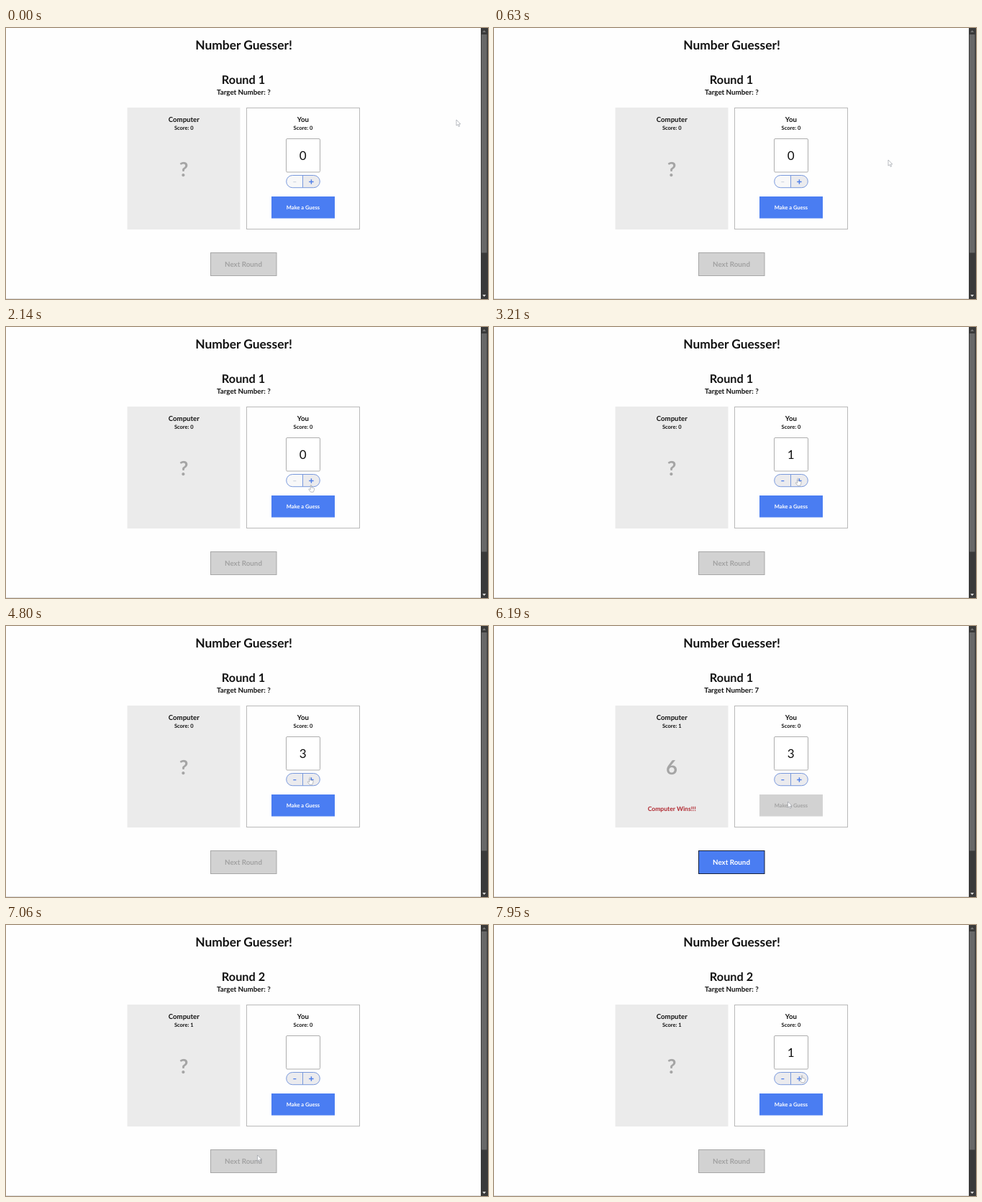
Write an HTML page that moves like this. It is 670x378 px and loops after 8 s.

```html
<!DOCTYPE html>
<html lang="en">
<head>
<meta charset="utf-8">
<title>Number Guesser</title>
<style>
  html, body { margin: 0; width: 100%; height: 100%; overflow: hidden; background: #fefefe; }
  svg { display: block; width: 670px; height: 378px; }
  text { font-family: Lato, "Open Sans", sans-serif; font-weight: 700; text-anchor: middle;
         fill: #111; text-rendering: geometricPrecision; }
  .label { font-size: 9.6px; }
  .score { font-size: 7.5px; }
  .sign { font-size: 12px; fill: #4f7fe8; }
  .off .sign { fill: #d3d8e2; }
  .half { fill: #ebebee; }
  .off .half { fill: #f8f8f9; }
  .button rect { fill: #4a7df2; stroke: #4a7df2; }
  .button text { fill: #fff; }
  .button.off rect { fill: #d2d2d2; stroke: #d2d2d2; }
  .button.off text { fill: #a2a2a2; }
  #next rect { stroke: #16213c; }
  #next.off rect { stroke: #a6a6a6; }
  .pointer { fill: #fff; stroke: #8d929b; stroke-width: .6; stroke-linejoin: round; }
</style>
</head>
<body>
<svg viewBox="0 0 670 378">
  <rect width="670" height="378" fill="#fefefe"/>
  <rect y="377" width="660" height="1" fill="#dedede"/>

  <text x="330.5" y="30" font-size="17.4">Number Guesser!</text>
  <text id="round" x="330" y="78" font-size="16.3"></text>
  <text id="target" x="330.3" y="93" font-size="9.8"></text>

  <rect x="168.5" y="111" width="157" height="170" fill="#ebebeb"/>
  <text class="label" x="247.3" y="131">Computer</text>
  <text class="score" id="score" x="247.3" y="141.5"></text>
  <text id="pick" x="247" y="206.8" font-size="27.5" style="fill:#a5a5a5"></text>
  <text id="result" x="247.3" y="257.8" font-size="8.6" style="fill:#b0272f">Computer Wins!!!</text>

  <rect x="334.5" y="111.5" width="157" height="169" fill="none" stroke="#b9b9b9"/>
  <text class="label" x="412.8" y="131.2">You</text>
  <text class="score" x="413" y="142">Score: 0</text>
  <rect x="389.5" y="154.5" width="47" height="46.5" rx="1.5" fill="#fff" stroke="#adadad"/>
  <text id="value" x="412.8" y="183.6" font-size="17" style="font-weight:400"></text>

  <g id="minus">
    <path class="half" d="M412.5 205.5h-14a8.6 8.6 0 0 0 0 17.2h14z"/>
    <rect class="sign" x="399.3" y="214" width="4" height="1.3"/>
  </g>
  <path class="half" d="M412.5 205.5h15a8.6 8.6 0 0 1 0 17.2h-15z"/>
  <path d="M421.2 214.5h6.4M424.4 211.3v6.4" stroke="#4f7fe8" stroke-width="1.4"/>
  <rect x="389.7" y="205.5" width="46.6" height="17.2" rx="8.6" fill="none" stroke="#7898dc"/>
  <path d="M412.5 205.5v17.2" stroke="#7898dc"/>

  <g class="button" id="guess">
    <rect x="369.5" y="235.5" width="87" height="29.5"/>
    <text x="413" y="252.8" font-size="7.5">Make a Guess</text>
  </g>
  <g class="button" id="next">
    <rect x="284.5" y="313.5" width="91.5" height="32"/>
    <text x="330" y="332.6" font-size="9.8">Next Round</text>
  </g>

  <rect x="660" width="10" height="378" fill="#3a3a3a"/>
  <rect x="661" y="9" width="7.5" height="304.5" fill="#686868"/>
  <path d="M662.3 6l2.4-3 2.4 3z" fill="#777"/>
  <path d="M662.3 372l2.4 3 2.4-3z" fill="#ddd"/>

  <path class="pointer" id="arrow" d="M0 0v8.2l1.9-1.7 1.3 3 1.4-.6-1.3-2.9h2.5z"/>
  <path class="pointer" id="hand" d="M-.7.7q.7-1.2 1.4 0v3.1l3.1.8q.9.3.8 1.3l-.6 2.6-.8 1.7h-3.7l-2.6-3.4q-.4-1 .7-1l1.7 1z"/>
</svg>
<script>
const LOOP = 8000;
const $ = id => document.getElementById(id);

// [start, end, x, y]: the pointer reaches x, y at end
const moves = [
  [0, 0, 626, 128],
  [30, 380, 548, 184],
  [630, 1060, 462, 238],
  [1200, 1410, 433, 249],
  [1410, 1580, 430, 248],
  [1720, 2140, 424, 220],
  [2390, 2750, 422.5, 211],
  [4800, 5090, 408.5, 245],
  [6190, 6980, 349.5, 321],
  [7060, 7800, 428, 209.5]
];

// [time, value]
const values = [[0, "0"], [3210, "1"], [3670, "2"], [4330, "3"], [7030, ""], [7950, "1"]];

const ease = p => p * p * (3 - 2 * p);

function pointerAt(t) {
  let [, , x, y] = moves[0];
  for (const [start, end, toX, toY] of moves.slice(1)) {
    if (t < start) break;
    const p = ease(Math.min(1, (t - start) / (end - start)));
    x += (toX - x) * p;
    y += (toY - y) * p;
  }
  return [x, y];
}

const inside = (x, y, l, t, r, b) => x >= l && x <= r && y >= t && y <= b;

function setText(id, text) {
  if ($(id).textContent !== text) $(id).textContent = text;
}

function render(t) {
  const revealed = t >= 5270 && t < 7030;
  const second = t >= 7030;
  const value = values.filter(([at]) => at <= t).pop()[1];

  setText("round", second ? "Round 2" : "Round 1");
  setText("target", "Target Number: " + (revealed ? "7" : "?"));
  setText("score", "Score: " + (t >= 5270 ? 1 : 0));
  setText("pick", revealed ? "6" : "?");
  setText("value", value);
  $("result").style.display = revealed ? "" : "none";
  $("minus").classList.toggle("off", value === "0");
  $("guess").classList.toggle("off", revealed);
  $("next").classList.toggle("off", !revealed);

  const [x, y] = pointerAt(t);
  const active = inside(x, y, value === "0" ? 412 : 390, 205, 436, 223)
    || (!revealed && inside(x, y, 369, 235, 457, 265))
    || (revealed && inside(x, y, 284, 313, 376, 346));
  for (const id of ["arrow", "hand"]) {
    $(id).setAttribute("transform", `translate(${x} ${y})`);
    $(id).style.display = (id === "hand") === active ? "" : "none";
  }
}

const begin = performance.now();
function frame() {
  render((performance.now() - begin) % LOOP);
  requestAnimationFrame(frame);
}
frame();
</script>
</body>
</html>
```
